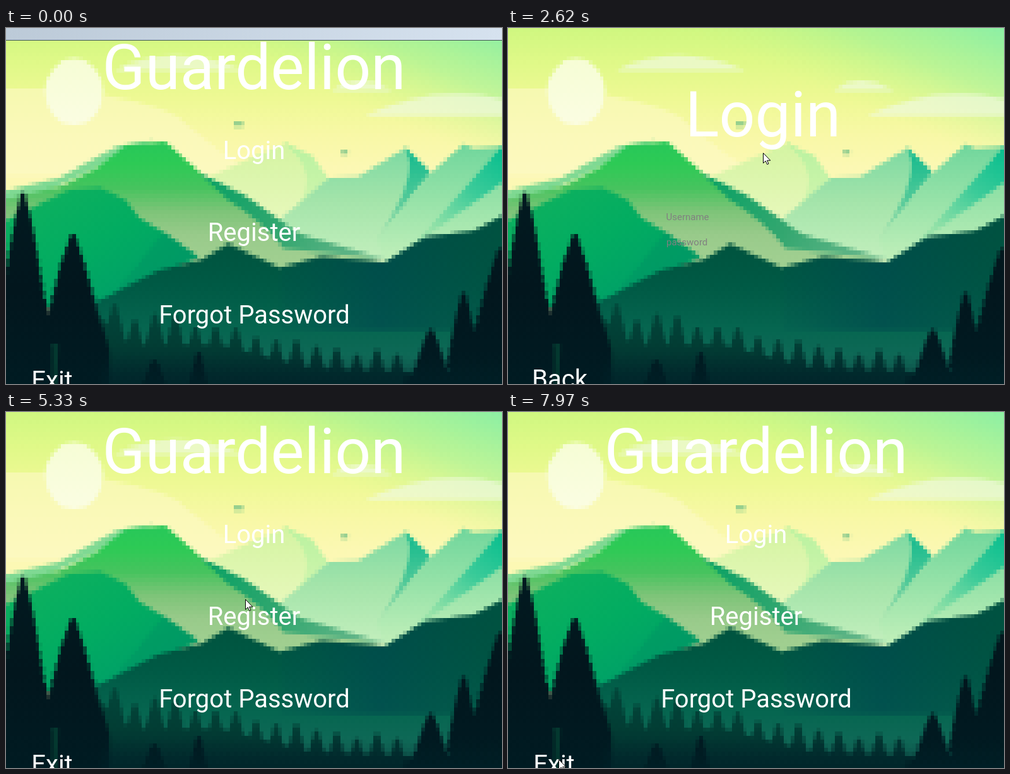
An HTML page with a canvas that plays this animation: 786x565 px, repeating every 8170 ms.

```html
<!DOCTYPE html>
<html lang="en">
<head>
<meta charset="utf-8">
<title>Menu screens</title>
<style>
  html, body { margin: 0; width: 100%; height: 100%; overflow: hidden; background: #013; }
  canvas, svg { position: absolute; left: 0; top: 0; width: 786px; height: 565px; display: block; }
  canvas { image-rendering: pixelated; }
  svg { overflow: hidden; }
  text { font-family: Roboto, sans-serif; fill: #fff; white-space: pre; }
  .title { font-size: 100px; text-anchor: middle; }
  .link { font-size: 40px; text-anchor: middle; }
  .small { font-size: 15px; text-anchor: middle; }
  .hint { font-size: 15px; fill: #808080; }
</style>
</head>
<body>
<canvas id="scene" width="135" height="88"></canvas>
<svg viewBox="0 0 786 565">
  <defs>
    <linearGradient id="barFill">
      <stop offset="0" stop-color="#bccad8"/><stop offset="1" stop-color="#d6e2ef"/>
    </linearGradient>
  </defs>
  <g id="bar">
    <rect width="786" height="19" fill="url(#barFill)"/>
    <rect y="19" width="786" height="1" fill="#3f5a50"/>
  </g>
  <g id="menu">
    <text class="title" x="393" y="97">Guardelion</text>
    <text class="link" x="393" y="208">Login</text>
    <text class="link" x="393" y="338">Register</text>
    <text class="link" x="393.5" y="469">Forgot Password</text>
    <text class="link" x="73" y="573">Exit</text>
  </g>
  <g id="login">
    <text class="title" x="394" y="172">Login</text>
    <text class="hint" x="240.5" y="305">Username</text>
    <text class="hint" x="241" y="345">password</text>
    <text class="link" x="72" y="571">Back</text>
  </g>
  <g id="register">
    <text class="title" x="393" y="122">Register</text>
    <text class="hint" x="239.5" y="204">Username</text>
    <text class="hint" x="239.5" y="244">DD/MM/YYYY</text>
    <text class="hint" x="239.5" y="281">Password</text>
    <text class="small" x="393.5" y="394">Generate Transfer Code</text>
    <text class="link" x="72" y="586">Back</text>
  </g>
  <path id="cursor" d="M.5.5V16.5L4.2 13 6.7 18.5 9 17.5 6.6 12.2H11.8Z" fill="#fff" stroke="#000"/>
</svg>
<script>
const W = 786, H = 565, LOOP = 8170;
const $ = id => document.getElementById(id);

// ---- landscape, drawn small and scaled up into blocks ----
const cv = $('scene'), ctx = cv.getContext('2d');
ctx.scale(cv.width / W, cv.height / H);

function grad(x0, y0, x1, y1, ...colors) {
  const g = ctx.createLinearGradient(x0, y0, x1, y1);
  colors.forEach((c, i) => g.addColorStop(i / (colors.length - 1), c));
  return g;
}
const fall = (y0, y1, ...colors) => grad(0, y0, 0, y1, ...colors);

function shape(fill, d) {
  ctx.fillStyle = fill;
  ctx.fill(new Path2D(`M${d}Z`));
}

let seed = 7;
const random = () => (seed = seed * 16807 % 2147483647) / 2147483647;

const cloud = (x0, x1, y, h) =>
  shape('rgba(240,250,222,.7)', `${x0} ${y}Q${(x0 + x1) / 2 - 10} ${y - 2 * h} ${x1} ${y}`);

// fir with a ragged outline; half is its half width at the base
function fir(fill, x, top, half, base) {
  const n = Math.max(3, Math.round((base - top) / 13));
  const left = [], right = [];
  for (let i = 1; i <= n; i++) {
    const y = top + (base - top) * i / n;
    const w = half * Math.pow(i / n, .8) + 1;
    left.unshift(`${x - w * .86} ${y}`, `${x - w} ${y - 3}`);
    right.push(`${x + w} ${y - 3}`, `${x + w * .86} ${y}`);
  }
  shape(fill, `${x - 3} ${top}H${x + 3}L${right.join(' ')} ${left.join(' ')}`);
}

function sky() {
  const all = `0 0H${W}V${H}H0`;
  shape(fall(0, 225, '#cff780', '#e0f988', '#eef994', '#f8f8a6', '#fcf8b4'), all);
  shape(grad(700, -40, 620, 150, 'rgba(126,238,172,.85)', 'rgba(150,240,160,.5)', 'rgba(200,248,140,0)'), all);
  shape('rgba(254,250,198,.6)', '0 97H60Q240 110 290 155T400 235H0');
  cloud(172, 376, 67, 24);
  cloud(516, 612, 100, 16);
  cloud(568, 870, 140, 36);
  ctx.beginPath();
  ctx.ellipse(108, 101.5, 46, 53, 0, 0, 7);
  ctx.fillStyle = fall(49, 154, '#f6fdd5', '#fbfde2');
  ctx.fill();
  shape('#78c288', '361 149h15v6h-15ZM531 195h11v6h-11');
}

function mountains() {
  // pale middle peak with its shaded side
  shape(fall(185, 310, '#d4f4a2', '#e8f8bc'), '318 238L445 182 512 240 430 310');
  shape(fall(185, 290, '#b9f2a0', '#d2f5ae'), '440 182L485 202 512 240 455 290Q505 235 440 182');
  // right peaks
  shape(fall(190, 360, '#7cd9a2', '#a4e4aa', '#c0eebb'), '425 312L512 238 558 236 635 189 690 250 640 370H540');
  shape(fall(190, 335, '#10b98c', '#48c797', '#9fdeaa'), '632 189L672 228 588 336Q645 250 640 212');
  shape(fall(185, 360, '#70d69c', '#96e2a8', '#bdeeb8'), '588 336L674 230 725 185 742 191 786 187V320L600 370');
  shape(grad(786, 190, 690, 330, '#06be8e', '#3ccb99', '#96e2a8'), '786 187L745 235 645 345 786 245');
  // main hill
  shape('#7fd993', '0 258L85 237 175 187 235 178 0 290');
  const lit = fall(179, 365, '#27c759', '#2dca55', '#46c35e', '#7dc478', '#98ca8a', '#a0cf90');
  shape(lit, '0 272L90 250 145 221 190 186 252 179 315 236 470 333 590 368 500 390H0');
  shape(grad(310, 235, 590, 370, '#06a063', '#34a770', '#6db98e'),
    '306 230L380 266 466 328 600 366 440 350Q410 310 350 272');
  // nearer hill
  shape(grad(90, 255, 180, 430, '#0cb05f', '#02ac61', '#00a067'),
    '0 305L100 257 150 254 190 273 210 300 250 324 305 363 150 445H0');
  shape('rgba(0,140,98,.35)', '250 324L305 363 165 430Z');
}

function valley() {
  shape(fall(345, 545, '#00543f', '#005a45', '#066650', '#136a5a'),
    '70 445L150 432 240 386 310 368 352 342 434 381 500 363 600 373 664 332 740 323 786 298V565H70');
  shape(grad(400, 0, 786, 0, 'rgba(0,76,78,0)', 'rgba(0,74,78,.7)', 'rgba(0,80,66,.5)'),
    '434 381L500 363 600 373 664 332 740 323 786 298V480H434');
}

function woods() {
  const row = fall(440, 565, '#02463a', '#023d34', '#01282c');
  shape(row, '130 440L195 502H340L480 540 786 550V565H130');
  for (let i = 0; i < 15; i++) {
    const top = 438 + i * 5.2 + random() * 22;
    fir(row, 172 + i * 32, top, 18, top + 62);
  }
  const dark = fall(260, 565, '#021a20', '#02161d', '#001b22');
  fir('#04382f', 90, 370, 26, 565);
  fir(dark, 27, 261, 46, 490);
  fir(dark, 106, 328, 53, 500);
  shape(dark, '0 430H62L73 470V565H0ZM84 470H152L164 510V565H80');
  fir(dark, 235, 528, 26, 585);
  fir(dark, 305, 516, 20, 590);
  fir(dark, 673, 478, 36, 575);
  fir(dark, 725, 420, 28, 540);
  fir(dark, 784, 350, 46, 490);
  shape(dark, '786 450Q720 480 700 545L630 555V565H786');
  shape(fall(520, 565, 'rgba(0,34,40,0)', 'rgba(0,34,40,.5)'), '150 520H786V565H150');
}

sky();
mountains();
valley();
woods();

// ---- motion ----
const SLIDE = 560, BAR_END = 1200;
const slides = [
  { at: 2125, from: 'menu', to: 'login', dir: -1 },
  { at: 4243, from: 'login', to: 'menu', dir: 1 },
  { at: 5565, from: 'menu', to: 'register', dir: -1 },
  { at: 7225, from: 'register', to: 'menu', dir: 1 }
];
// start, end, x, y
const moves = [
  [300, 470, 522, 361],
  [660, 920, 465, 283],
  [1120, 1380, 437, 235],
  [1610, 1940, 404, 198],
  [2920, 3060, 230, 380],
  [3220, 4010, 91, 540],
  [4890, 5040, 379, 297],
  [5950, 6115, 120, 496],
  [6150, 6960, 80, 551]
];
const outQuad = p => 1 - (1 - p) * (1 - p);
const part = (t, a, b) => Math.min(1, Math.max(0, (t - a) / (b - a)));
const move = (el, x, y) => el.setAttribute('transform', `translate(${Math.round(x)} ${Math.round(y)})`);

function place(t) {
  const x = { menu: 0, login: W, register: W };
  for (const { at, from, to, dir } of slides) {
    if (t < at) break;
    const p = outQuad(part(t, at, at + SLIDE));
    x[from] = dir * W * p;
    x[to] = -dir * W * (1 - p);
  }
  for (const id in x) move($(id), x[id], 0);
}

function point(t) {
  let x = 706, y = 566;
  for (const [a, b, tx, ty] of moves) {
    const p = outQuad(part(t, a, b));
    x += (tx - x) * p;
    y += (ty - y) * p;
  }
  move($('cursor'), x, y);
}

function draw(now) {
  const t = now % LOOP;
  $('bar').style.display = t < BAR_END ? '' : 'none';
  place(t);
  point(t);
}

const begin = performance.now();
function tick() {
  draw(performance.now() - begin);
  requestAnimationFrame(tick);
}
tick();
</script>
</body>
</html>
```
